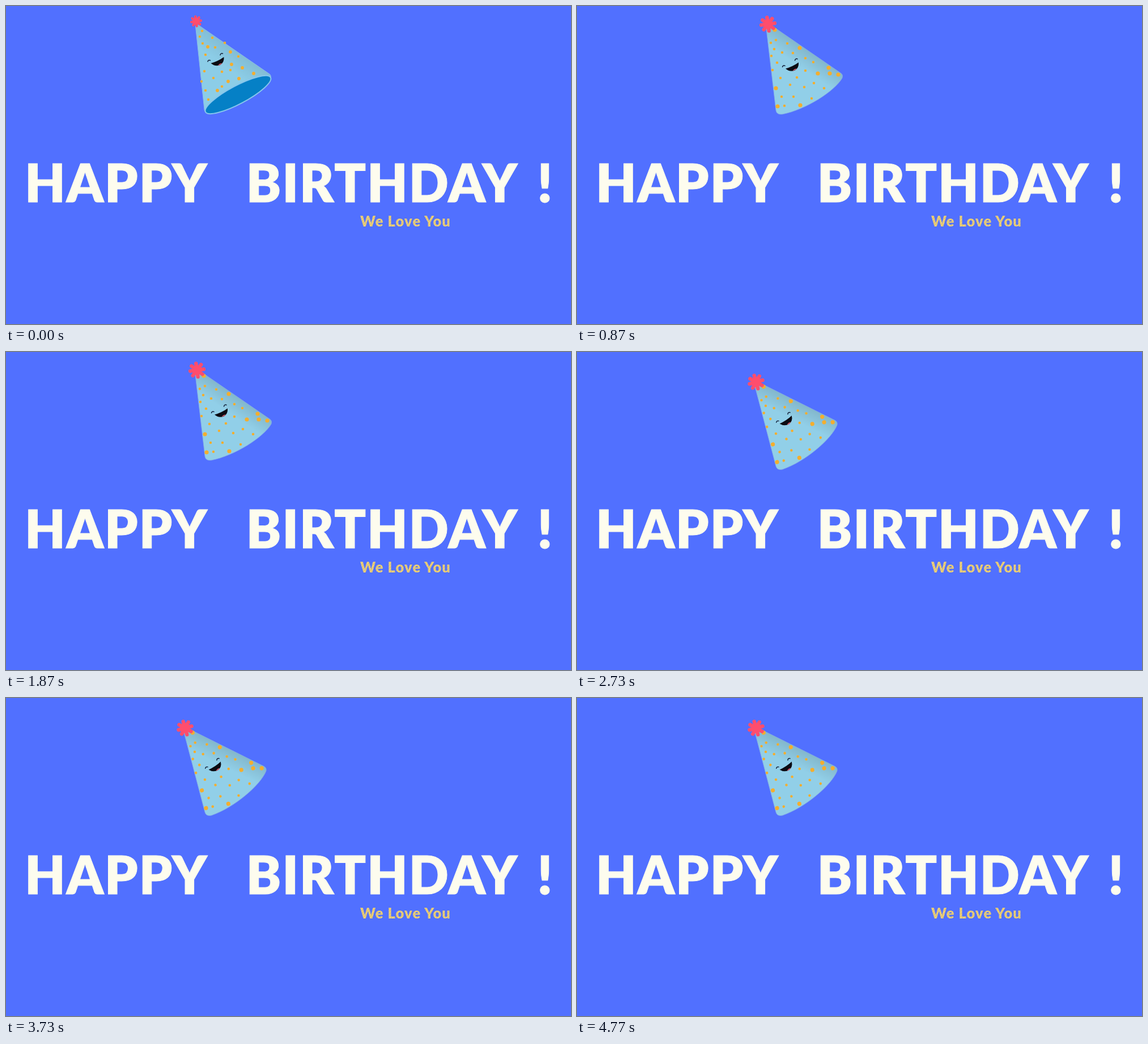
An HTML page for the animation above (4.93 s loop, 997x561 px).

```html
<!DOCTYPE html>
<html lang="en">
<head>
<meta charset="utf-8">
<title>Happy Birthday</title>
<style>
  html, body { margin: 0; width: 100%; height: 100%; overflow: hidden; background: #5170ff; }
  svg { display: block; width: 997px; height: 561px; }
  text { font-family: Lato, "Open Sans", sans-serif; font-weight: 900; text-anchor: middle; }
  .title { font-size: 92px; letter-spacing: 2px; fill: #fdfcee; stroke: #fdfcee; }
  .note { font-size: 25.5px; letter-spacing: 1.1px; fill: url(#glitter); }
  .dots { fill: none; stroke: #f4ae2e; stroke-linecap: round; stroke-width: 4.6; }
  .mid { stroke-width: 5.8; }
  .big { stroke-width: 7.2; }
  .eyes { fill: none; stroke: #14213a; stroke-width: 1.5; stroke-linecap: round; }
  .mouth { fill: #0b0b12; }
  .tongue { fill: #d4586c; }
  .pom { fill: none; stroke: #ff4d6d; stroke-width: 6.4; stroke-linecap: round; }
</style>
</head>
<body>
<svg viewBox="0 0 997 561">
  <defs>
    <linearGradient id="shade" gradientUnits="userSpaceOnUse" x1="422" y1="86" x2="403" y2="114">
      <stop offset="0" stop-color="#82b6ca"/>
      <stop offset="1" stop-color="#91cfe8"/>
    </linearGradient>
    <linearGradient id="sheen" gradientUnits="userSpaceOnUse" x1="405" y1="78" x2="385" y2="106">
      <stop offset="0" stop-color="#82bdd5"/>
      <stop offset="1" stop-color="#8ccde7"/>
    </linearGradient>
    <pattern id="glitter" width="5" height="5" patternUnits="userSpaceOnUse">
      <path fill="#e9cc73" d="M0 0h5v5H0z"/>
      <path stroke="#c8b489" stroke-width=".9" d="M0 3 2 1M3 5 5 3"/>
      <path stroke="#f8e5a4" stroke-width=".9" d="M2 3 3 2"/>
    </pattern>
    <path id="pom" class="pom" d="M-12 0H12M0-12V12M-8.5-8.5 8.5 8.5M-8.5 8.5 8.5-8.5"/>
    <g id="face">
      <path class="mouth" d="M-11.5 3.5Q1 0 11.5-7.5Q12.5 2 5 6.5Q-4 10-11.5 3.5Z"/>
      <path class="tongue" d="M1 7.5Q4 3 8.5 3.5Q6 6.5 1 7.5Z"/>
      <path class="eyes" d="M-17 .5Q-16-3-12.5-1.5M5-11Q6-15 9.5-13.5"/>
    </g>
  </defs>

  <g id="hat">
    <g id="open">
      <path fill="url(#sheen)" stroke="#8ab8ea" d="M334.5 36Q336 32 340 34L465 120Q469 123 466 130L358 188Q351 190 350 183Z"/>
      <ellipse rx="65" ry="16" transform="translate(409.5 156.5) rotate(-28)" fill="#0580c6" stroke="#86c6ed" stroke-width="2"/>
      <path class="dots" d="M346 44h0M364 56h0M342 54h0M386 65h0M347 66h0M369 73h0M410 89h0M352 86h0M350 115h0M381 116h0M396 113h0M366 127h0M345 133h0M381 142h0M352 149h0M357 165h0"/>
      <path class="dots mid" d="M356 72h0M396 81h0M398 103h0M417 109h0M437 119h0M411 128h0M392 133h0M373 149h0"/>
      <use href="#face" x="373" y="97.5"/>
      <use href="#pom" transform="translate(335.5 27) rotate(-8) scale(.7)"/>
    </g>
    <g id="shut">
      <path fill="url(#shade)" stroke="#84a9e6" stroke-width=".8" d="M334 40L350 39L465 118Q470 121 468 127C455 150 404 183 362 191Q352 192 351 184Z"/>
      <path class="dots" d="M351 60h0M362 82h0M371 66h0M348 76h0M381 83h0M353 100h0M342 65h0M343 88h0M403 92h0M417 99h0M345 113h0M403 114h0M388 126h0M359 127h0M376 139h0M361 160h0M382 160h0M401 143h0M418 136h0M436 145h0M414 163h0M366 176h0"/>
      <path class="dots big" d="M349 42h0M393 74h0M444 109h0M446 119h0M461 121h0M425 119h0M351 145h0M394 175h0M354 177h0"/>
      <use href="#face" x="379.5" y="107"/>
      <use href="#pom" transform="translate(337 32) rotate(-8)"/>
    </g>
  </g>

  <text class="title" x="195" y="345.5">HAPPY</text>
  <text class="title" x="664" y="345.5">BIRTHDAY</text>
  <text class="title" x="952" y="345.5">!</text>
  <text class="note" x="705" y="389">We Love You</text>
</svg>
<script>
  const LOOP = 4930, STEPS = 29;
  const poses = [[0, 0, 0], [-21, 21, -8], [-41, 36.5, -16]];
  const [hat, open, shut] = ["hat", "open", "shut"].map(id => document.getElementById(id));

  // Six steps a second, with a 1/30 s hold every ten steps.
  const startOf = k => 10 * Math.round((k * 500 + 100 * Math.floor((k + 5) / 10)) / 30);
  const starts = Array.from({ length: STEPS }, (_, k) => startOf(k));

  function draw() {
    const t = performance.now() % LOOP;
    const step = starts.findLastIndex(s => s <= t) % 6;
    const [x, y, turn] = poses[Math.min(step, 5 - step)];
    hat.setAttribute("transform", `translate(${x} ${y}) rotate(${turn} 337 32)`);
    open.style.display = step < 3 ? "" : "none";
    shut.style.display = step < 3 ? "none" : "";
    requestAnimationFrame(draw);
  }
  draw();
</script>
</body>
</html>
```
